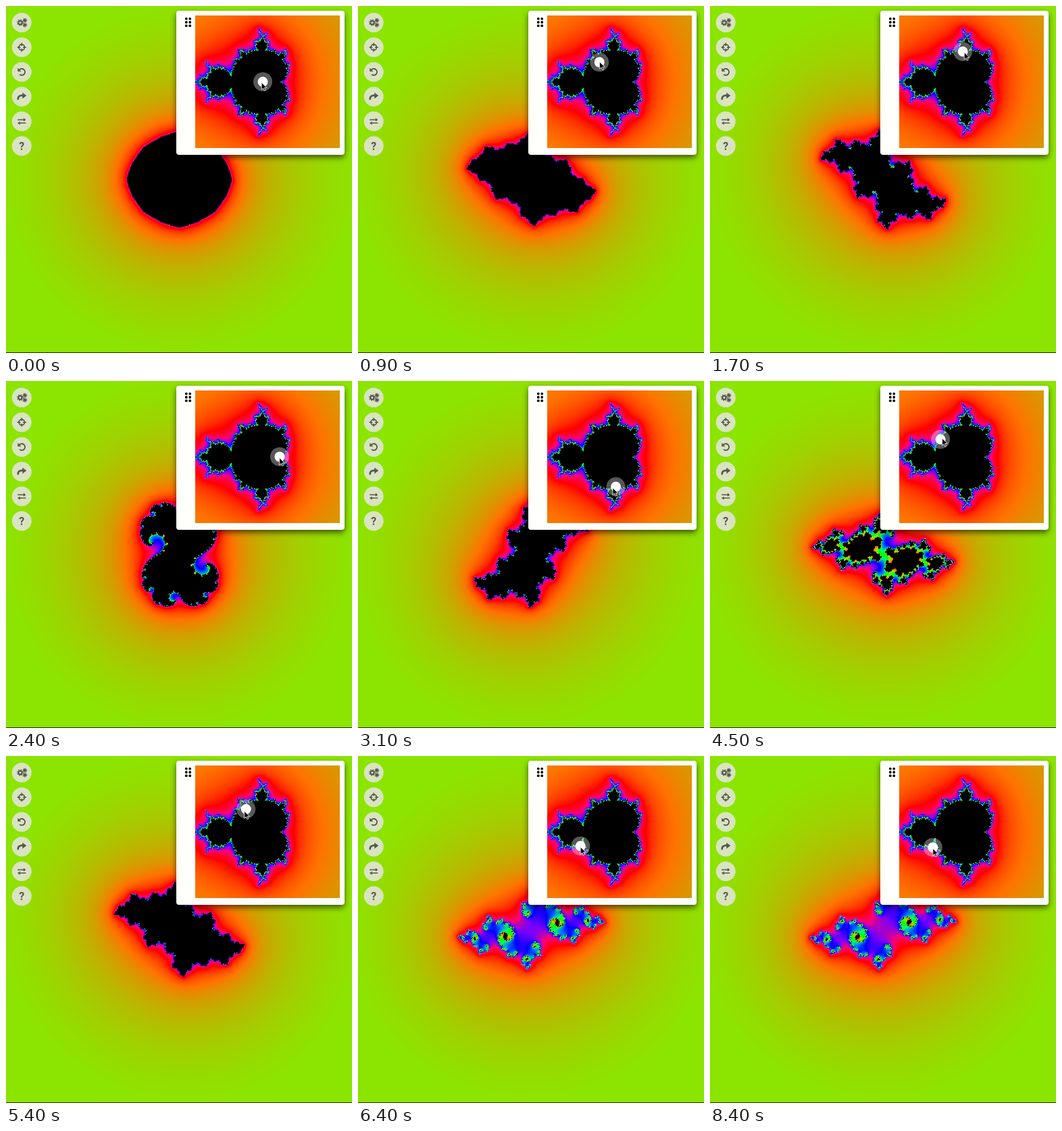
An HTML page with a canvas for the animation above (8500 ms loop, 512 by 513 pixels).

```html
<!DOCTYPE html>
<html lang="en">
<head>
<meta charset="utf-8">
<title>Julia set explorer</title>
<style>
  html, body { margin: 0; width: 100%; height: 100%; overflow: hidden; background: #90da00; }
  canvas, svg, .panel { position: absolute; display: block; }
  #julia, svg { left: 0; top: 0; width: 512px; height: 513px; }
  .panel { left: 252px; top: 7px; width: 249px; height: 213px; border-radius: 4px;
    background: #fffffc; box-shadow: 0 4px 9px rgba(0, 0, 0, .6); }
  #map { left: 280px; top: 14px; }
  .btn { fill: #e4e4dc; fill-opacity: .88; }
  .icon { fill: none; stroke: #55554f; stroke-width: 1.8; }
  .icon .solid { fill: #55554f; stroke: none; }
  text { font: bold 16px Roboto, Arial, sans-serif; fill: #55554f; text-anchor: middle; }
</style>
</head>
<body>
<canvas id="julia" width="512" height="513"></canvas>
<div class="panel"></div>
<canvas id="map" width="214" height="196"></canvas>
<svg viewBox="0 0 512 513">
  <rect y="512" width="512" height="1" fill="#1d3008"/>
  <g id="buttons"></g>
  <g id="grip"></g>
  <g id="dot">
    <circle r="14" fill="#fff" fill-opacity=".34"/>
    <circle r="7.5" fill="#fff"/>
  </g>
  <path id="cursor" d="M0 0V10.6L2.5 8.4L4.2 12.2L6 11.4L4.3 7.7H7.8Z" fill="#000" stroke="#fff" stroke-width=".8"/>
</svg>
<script>
const LOOP = 8500, STEP = 100;
const SCALE = 71.3, MID_X = 387, MID_Y = 112;
const MAX_ITER = 28, BAILOUT = 256;
const BLACK = 0xff000000;
const $ = id => document.getElementById(id);

// Colour wheel of three overlapping ramps, walked from green through red and blue
function wheel(level) {
  const p = Math.min(0.62, 0.57 - 0.13 * level);
  const channel = at => {
    const d = (((p - at) % 3) + 3) % 3;
    return Math.max(0, Math.min(255, 370 * (1 - Math.min(d, 3 - d))));
  };
  return (255 << 24 | channel(2) << 16 | channel(1) << 8 | channel(0)) >>> 0;
}
const LEVELS = 32, LOW = -1;
const palette = Array.from({ length: (MAX_ITER + 2) * LEVELS }, (_, k) => wheel(LOW + k / LEVELS));

function escapeColor(x, y, cx, cy) {
  let n = 0, xx = x * x, yy = y * y;
  while (xx + yy < BAILOUT) {
    if (++n > MAX_ITER) return BLACK;
    y = 2 * x * y + cy;
    x = xx - yy + cx;
    xx = x * x;
    yy = y * y;
  }
  const level = n - Math.log2(Math.log(xx + yy) / 2);
  return palette[Math.max(0, Math.round((level - LOW) * LEVELS))];
}

function painter(canvas, midX, midY) {
  const ctx = canvas.getContext('2d'), { width, height } = canvas;
  const img = ctx.createImageData(width, height);
  const px = new Uint32Array(img.data.buffer);
  return colorAt => {
    for (let j = 0, k = 0; j < height; j++)
      for (let i = 0; i < width; i++)
        px[k++] = colorAt((i - midX) / SCALE, (j - midY) / SCALE);
    ctx.putImageData(img, 0, 0);
  };
}

// Route around the cardioid: time, angle in degrees, size
const ROUTE = [
  [0, -180, .13], [1100, -140, .92], [1700, -124, .97], [2000, -100, .98],
  [2800, 85, .98], [3100, 117, .96], [3900, 180, 1.02], [4400, 195, 1.04],
  [4500, 202, 1], [5000, 230, .97], [5400, 215, .9], [6300, 165, 1.16], [8500, 163.4, 1.165]
];

// Cubic Hermite between the keys
function routeAt(t) {
  t = Math.max(0, Math.min(LOOP, t));
  const last = ROUTE.length - 1;
  let i = 0;
  while (i < last - 1 && ROUTE[i + 1][0] <= t) i++;
  const a = ROUTE[i], b = ROUTE[i + 1], span = b[0] - a[0], u = (t - a[0]) / span;
  const slope = (k, j) => {
    if (k >= last - 1) return 0;
    const p = ROUTE[Math.max(0, k - 1)], q = ROUTE[k + 1];
    return (q[j] - p[j]) / (q[0] - p[0]) * span;
  };
  return [1, 2].map(j => {
    const m = slope(i, j), n = slope(i + 1, j), d = b[j] - a[j];
    return a[j] + u * (m + u * (3 * d - 2 * m - n + u * (m + n - 2 * d)));
  });
}

function paramAt(t) {
  const [deg, size] = routeAt(t), w = deg * Math.PI / 180;
  return [
    size * (Math.cos(w) / 2 - Math.cos(2 * w) / 4),
    size * (Math.sin(w) / 2 - Math.sin(2 * w) / 4)
  ];
}

const gear = (x, y, r) =>
  `<circle cx="${x}" cy="${y}" r="${r}" stroke-width="2"/>` +
  `<circle cx="${x}" cy="${y}" r="${r + 1.5}" stroke-width="1.5" stroke-dasharray="${(r + 1.5) * Math.PI / 8}"/>`;
const ICONS = [
  gear(-2.3, 0, 2.6) + gear(4.6, -3.4, 1.2) + gear(4.6, 3.5, 1.2),
  '<circle r="4.2" stroke-width="1.6"/><path d="M0-6.5V-2M0 6.5V2M-6.5 0H-2M6.5 0H2" stroke-width="1.6"/>',
  '<path d="M-4-2.6A4.8 4.8 0 1 1-3.2 3.5"/><path class="solid" d="M-6-6V-.8H-.8Z"/>',
  '<path d="M-5.3 4.5C-6.3-.5-3-2 1.5-2" stroke-width="2.6"/><path class="solid" d="M1-6L7-1.6L1 2.8Z"/>',
  '<path d="M-6-2.4H3M6 2.4H-3" stroke-width="1.6"/><path class="solid" d="M2.6-5.2L6.2-2.4L2.6 .2ZM-2.6-.2L-6.2 2.4L-2.6 5.2Z"/>',
  '<text y="5.8" stroke="none">?</text>'
];
$('buttons').innerHTML = ICONS.map((icon, i) =>
  `<g transform="translate(23.3 ${24.6 + 36.5 * i})"><circle class="btn" r="14.5"/><g class="icon">${icon}</g></g>`).join('');
$('grip').innerHTML = Array.from({ length: 6 }, (_, i) =>
  `<circle cx="${266.8 + i % 2 * 5.4}" cy="${18.8 + (i >> 1) * 5.2}" r="1.9"/>`).join('');

painter($('map'), MID_X - 280, MID_Y - 14)((x, y) => escapeColor(0, 0, x, y));
const paintJulia = painter($('julia'), 256, 256);

function place(id, [x, y], drop = 0) {
  const px = MID_X + x * SCALE, py = MID_Y + y * SCALE + drop;
  $(id).setAttribute('transform', `translate(${px.toFixed(1)} ${py.toFixed(1)})`);
}

// The fractal trails the dot, the dot trails the cursor
function draw(t) {
  const [cx, cy] = paramAt(t - 90);
  paintJulia((x, y) => escapeColor(x, y, cx, cy));
  place('dot', paramAt(t));
  place('cursor', paramAt(t + 50), 1.5);
}

let shown = -1;
const start = performance.now();
function tick() {
  const t = Math.floor((performance.now() - start) % LOOP / STEP) * STEP;
  if (t !== shown) draw(shown = t);
  requestAnimationFrame(tick);
}
tick();
</script>
</body>
</html>
```
